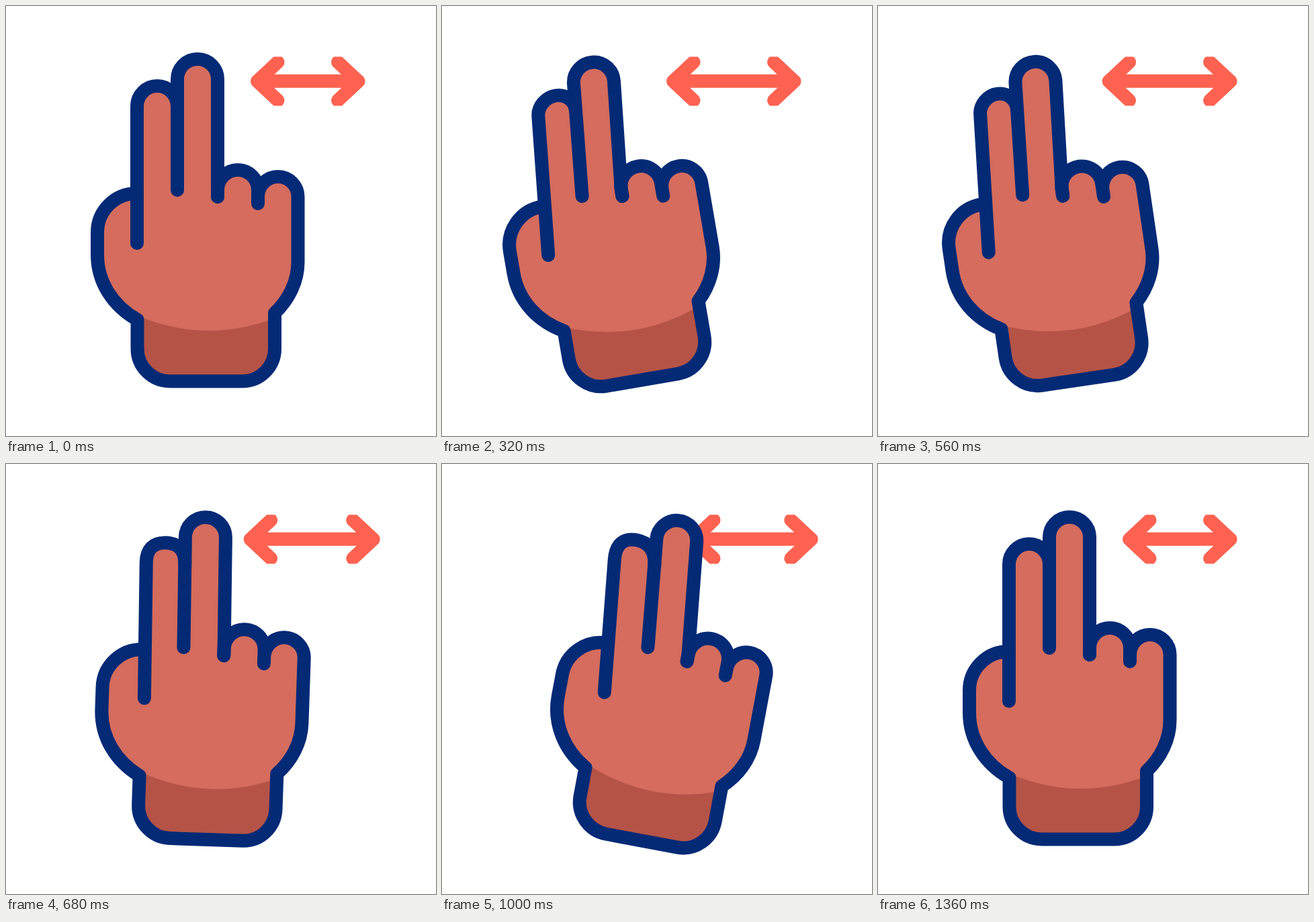
An HTML page that plays this animation: 640x640 px, repeating every 1480 ms.

```html
<!DOCTYPE html>
<html lang="en">
<head>
<meta charset="utf-8">
<title>Two-finger swipe</title>
<style>
  html, body { margin: 0; width: 100%; height: 100%; overflow: hidden; background: #fff; }
  svg { display: block; width: 100%; height: 100%; }
  .line { fill: none; stroke: #042a76; stroke-width: 20; stroke-linecap: round; stroke-linejoin: round; }
  .skin { fill: #d56c5d; }
  .cuff { fill: #b55347; }
  .arrow { fill: none; stroke: #ff6250; stroke-width: 20; stroke-linecap: round; stroke-linejoin: round; }
</style>
</head>
<body>
<svg viewBox="0 0 640 640">
  <defs>
    <clipPath id="band"><rect y="75.5" width="640" height="73"/></clipPath>
    <path id="palm" d="M315 284V274A30 30 0 0 1 375 274V294V284A29.75 30 0 0 1 434.5 284V381
      C434.5 410 421 437 400 457V510A48 48.5 0 0 1 352 558.5H244A48.5 48.5 0 0 1 195.5 510V467
      C160 447 136 412 136 370V337A58 58 0 0 1 194 279"/>
  </defs>
  <g clip-path="url(#band)"><path id="arrow" class="arrow"/></g>
  <g id="hand">
    <use href="#palm" class="skin"/>
    <path class="cuff" d="M195.5 461Q300 504 400 464V510A48 48.5 0 0 1 352 558.5H244A48.5 48.5 0 0 1 195.5 510Z"/>
    <path id="indexFill" class="skin"/>
    <path id="middleFill" class="skin"/>
    <path id="indexLine" class="line"/>
    <path id="middleLine" class="line"/>
    <use href="#palm" class="line"/>
  </g>
</svg>
<script>
const LOOP = 1480, STEP = 40;
const el = id => document.getElementById(id);
const arrow = el('arrow'), hand = el('hand');
const indexFill = el('indexFill'), indexLine = el('indexLine');
const middleFill = el('middleFill'), middleLine = el('middleLine');

// Tracks of [time, value]
const turn = [[105, 0], [435, -13.5], [876, 13], [1325, 0]];
const leftTip = [[165, 0], [416, -44.5], [800, 0]];
const rightTip = [[560, 0], [800, 44.5], [1240, 0]];
const drift = [[100, 0], [320, 1.7], [560, 3], [680, 2.8], [1000, 2], [1200, 0.8], [1335, 0]];
const square = [[560, 0.55], [680, 0.65], [1000, 0.65], [1200, 0.55]];

const smooth = u => u * u * (3 - 2 * u);
const linear = u => u;

function at(track, t, ease = smooth) {
  if (t <= track[0][0]) return track[0][1];
  for (let i = 1; i < track.length; i++) {
    const [t0, a] = track[i - 1], [t1, b] = track[i];
    if (t < t1) return a + (b - a) * ease((t - t0) / (t1 - t0));
  }
  return track[track.length - 1][1];
}

const str = p => p.map(v => v.toFixed(2)).join(' ');
const add = (p, q, k = 1) => [p[0] + q[0] * k, p[1] + q[1] * k];

function spin([x, y], [cx, cy], a) {
  const c = Math.cos(a), s = Math.sin(a);
  return [cx + (x - cx) * c - (y - cy) * s, cy + (x - cx) * s + (y - cy) * c];
}

function drawArrow(l, r) {
  const head = (tip, arm) => `M${arm} 83.5L${tip} 112L${arm} 140.5`;
  const a = 374 + l, b = 524.5 + r;
  arrow.setAttribute('d', head(a, a + 30.5) + head(b, b - 30.5) + `M${a} 111.8H${b}`);
}

function drawHand(angle, shift, k) {
  hand.setAttribute('transform', `rotate(${angle} 286 557)`);

  // The long fingers lag behind the palm
  const a = -0.58 * angle * Math.PI / 180;
  const knuckle = [285, 279];
  const m = p => spin(p, knuckle, a);
  const gap = [255 - 0.1 * angle, 274];
  const middle = `M${str(gap)}L${str(m([255, 109]))}A30 30 0 0 1 ${str(m([315, 109]))}L315 274`;
  middleLine.setAttribute('d', middle + 'V284');
  middleFill.setAttribute('d', middle + 'V300H255Z');

  const base = [195 - 53 * Math.sin(a) + shift, 353 - 0.6 * shift];
  const left = add(spin([195, 149], [235, 300], a), [shift, 0]);
  const right = m([255, 149]);
  const up = [Math.sin(a), -Math.cos(a)];
  const half = [(right[0] - left[0]) / 2, (right[1] - left[1]) / 2];
  const h = 30 + 0.35 * angle;
  const top = add(add(left, half), up, h);
  const index = `M${str(base)}L${str(left)}` +
    `C${str(add(left, up, h * k))} ${str(add(top, half, -k))} ${str(top)}` +
    `C${str(add(top, half, k))} ${str(add(right, up, h * k))} ${str(right)}`;
  indexLine.setAttribute('d', index);
  indexFill.setAttribute('d', index + `L${str(gap)}V353Z`);
}

function frame() {
  const t = Math.floor((performance.now() % LOOP) / STEP) * STEP;
  drawArrow(at(leftTip, t), at(rightTip, t));
  drawHand(at(turn, t), at(drift, t, linear), at(square, t, linear));
  requestAnimationFrame(frame);
}
frame();
</script>
</body>
</html>
```
